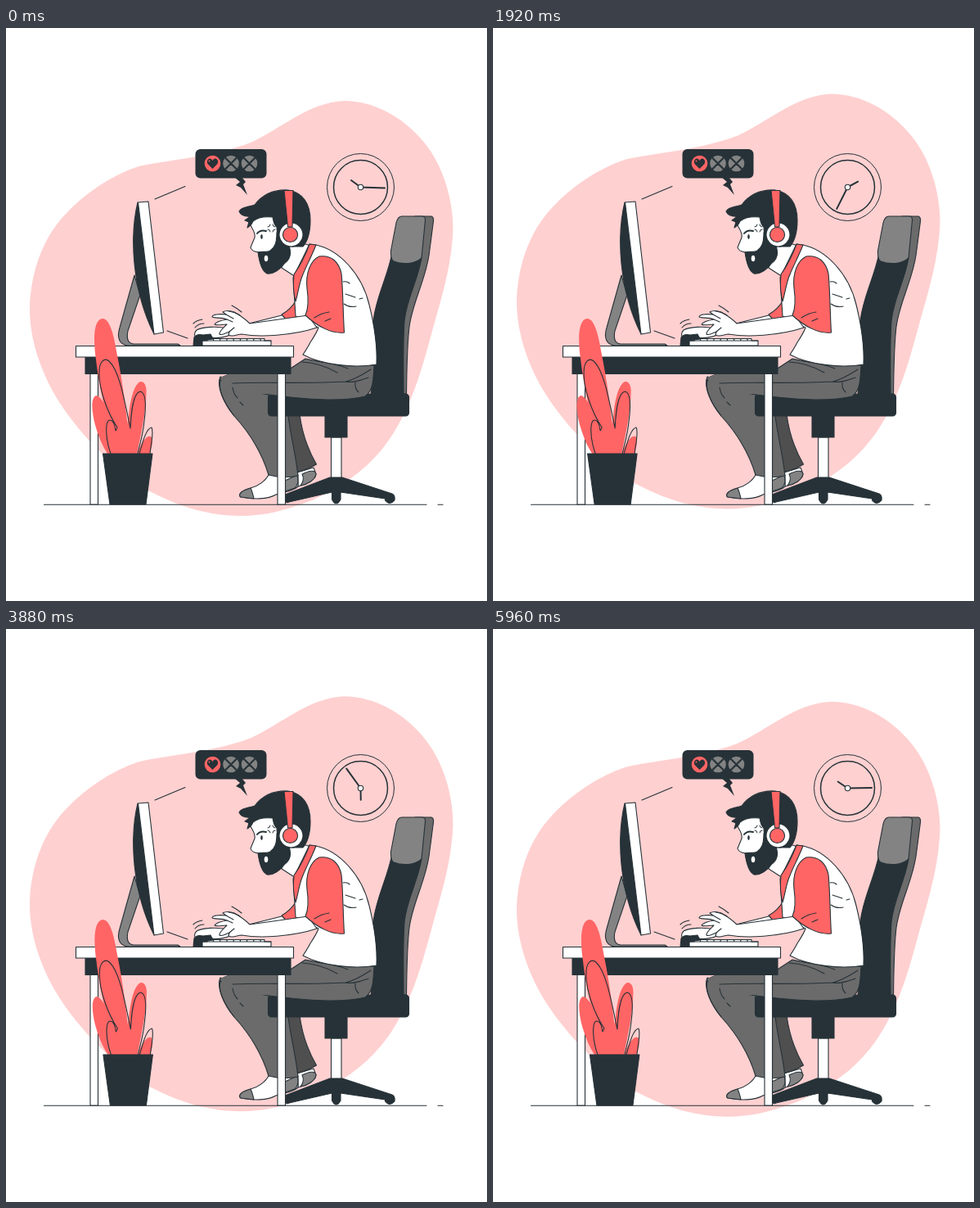
An HTML page that plays this animation: 588x700 px, repeating every 6 s.

```html
<!DOCTYPE html>
<html lang="en">
<head>
<meta charset="utf-8">
<title>Long night at the desk</title>
<style>
html, body { margin: 0; width: 100%; height: 100%; overflow: hidden; background: #fff; }
svg { display: block; width: 588px; height: 700px; }
.ink { stroke: #263238; stroke-width: 1.1; stroke-linecap: round; stroke-linejoin: round; fill: none; }
.white { fill: #fff; }
.red { fill: #ff6565; }
.dark { fill: #263238; }
.grey { fill: #838383; }
.cloth { fill: #6b6b6b; }
.shade { fill: #4f4f4f; }
.bare { stroke: none; }
</style>
</head>
<body>
<svg viewBox="0 0 588 700">
  <path id="blob" fill="#ffd0d0" d="M413 89C462 89 508 124 529 168C543 198 548 230 546 255C543 300 529 340 517 385C506 425 494 464 471 499C447 535 416 558 374 577C340 590 315 596 287 596C240 596 200 580 165 560C125 532 85 490 62 452C40 415 28 375 29 338C31 298 44 257 74 226C98 201 127 181 162 169C205 160 254 157 299 140C338 122 370 91 413 89Z"/>

  <g class="ink">
    <!-- clock -->
    <circle cx="433.5" cy="194.5" r="41" stroke-width="1"/>
    <circle cx="433.5" cy="194.5" r="33" style="stroke-width:1.5"/>
    <g id="hands" style="stroke-width:2">
      <path d="M433.5 194.5L463 195.4M433.5 194.5L422 186"/>
    </g>
    <circle class="white" cx="433.5" cy="194.5" r="3.2"/>

    <path d="M182 209L219 193.5M197 370L222 379"/>
    <path d="M46.5 582.3H514M528 582.3H534"/>

    <!-- chair back and base -->
    <path class="cloth" d="M500 230H520Q523 231 522.5 236L517 278C512 310 497 335 493 365C490 390 490 420 489.500 447H480V300Z"/>
    <path class="dark" d="M472 275C466 305 452 330 449 358L446 450H486C486 415 485 385 487 358C490 330 503 310 508 281Z"/>
    <path class="grey" d="M484 230H508Q513 230 512.500 235L508 281C500 289 484 289 474 285Q470 283 470.500 272L477 238Q479 230 484 230Z"/>
    <path class="white" d="M397.500 500H410V552H397.500Z"/>
    <path class="dark" d="M396 549H411L472 569Q476 571 475 577Q469 584 463.500 577V575L409 567V576Q403.500 586 398.500 576V567L346 579Q340 582 341 570Z"/>
    <path class="dark" d="M390 474H417V500H390Z"/>

    <!-- far leg and foot -->
    <path class="white" d="M356 543L376 537L379 545C378 552 368 558 357 560Z"/>
    <path class="grey" d="M362 545C370 541 378 539 379 545C378 552 368 558 360 559C364 554 364 549 362 545Z"/>
    <path class="shade" d="M330 460L359 472C362 495 369 515 379.500 533C371 538 365 541 356 542Z"/>

    <!-- near foot -->
    <path class="white" d="M322 544C318 553 308 560 299 562C288 565 283 570 287 573C302 576 320 576 330 570C341 566 351 566 357 560V546Z"/>
    <path class="grey" d="M299 562C288 565 283 570 287 573L303 575C302 570 301 566 299 562ZM341 553L356 546Q359 557 353 562L341 566Z"/>

    <!-- near leg, seat and thigh -->
    <path class="cloth" d="M262 426C257 438 266 458 279 474C300 497 314 523 321 546Q340 551 357 547C354 520 348 498 345 474L322 440Z"/>
    <rect class="dark" x="320.500" y="447" width="172" height="27" rx="4"/>
    <path class="cloth" d="M366 404C395 411 425 412 450 412C449 430 449 443 439 450C410 457 370 454 322 448C308 446 290 442 272 438L262 430C266 420 290 421 340 421Z"/>
    <path class="cloth bare" d="M262 427L275 422H345L325 446L300 449L268 448Z"/>
    <path d="M277 434C315 432 365 435 415 432C428 429 438 422 446 417M415 432C424 434 434 430 443 427M362 408C380 409 393 414 405 421M380 407C395 409 408 412 418 416M427 433C426 439 428 442 431 445M277 439C278 446 280 449 283 452M286 457L290 461M262 430C259 441 266 458 279 474"/>

    <!-- monitor -->
    <path class="grey" d="M157 302L139 366C135 379 139 387 149 388H213L210 386H156Q146 385 149 370L164 326Z"/>
    <path class="dark" d="M161 213C151 255 154 320 181 374Z"/>
    <path class="white" d="M161.500 213L174 212L192.500 372L181 374Z"/>

    <!-- desk -->
    <path class="white" d="M103 422H112.500V582H103ZM332 422H341.500V582H332Z"/>
    <path class="dark" d="M97 402H348V422.500H97Z"/>
    <path class="white" d="M85.500 388.500H351.500V402H85.500Z"/>

    <!-- keyboard -->
    <path class="white" d="M246 382V379.500H316V382H324V388H239.500V382Z"/>
    <path d="M240 382H324"/>
    <path d="M253 380.700H316" style="stroke-width:2.400;stroke-dasharray:1.200 7;stroke-linecap:butt"/>

    <!-- far arm and mouse -->
    <path class="white" d="M271 367C258 364 240 365 233 369C230 372 230 376 232 378H252C258 380 270 377 276 374Z"/>
    <path class="dark" d="M229 388L230 378Q233 373 241 375L250 374L253 380L240 382V388Z"/>
    <path class="white" d="M341 350L297 361L300 370L355 358Z"/>
    <path class="red" d="M355 332C350 341 344 346 337 350Q341 354 343 358L359 356Z"/>

    <!-- neck and torso -->
    <path class="white" d="M337 293L354 304L373 266L345 258Z"/>
    <path class="white" d="M379 265C407 271 435 300 444 338C450 362 454 390 453 411C425 416 385 411 363 399C367 393 370 388 372 384C376 378 380 372 382 366L354 352L351 305L371 264Z"/>
    <path class="red" d="M371 264L379 265C373 280 367 291 363 301C358 312 357 325 354 334Q350 319 352 301C359 291 366 278 371 264Z"/>
    <path d="M412 310Q417 309 420 312M413 337Q420 342 428 340M415 325L427 329M432 331L436 330"/>

    <!-- near arm -->
    <path class="white" d="M369 351L298 361C292 355 286 351 279 347C274 345 268 345 265 347L269 350C260 349 252 350 252 353C256 355 264 353 270 356C264 357 257 359 255 362C258 364 264 362 270 362C266 366 260 371 261 374C264 376 268 373 273 371L272 375C277 378 283 374 288 374C310 378 350 376 380 366Z"/>
    <path d="M269 350L278 355M270 356L277 359M273 371L279 366"/>
    <path class="red" d="M383 279C398 277 407 286 410 300C412 320 412 350 413.500 372C398 374 380 364 366 351C370 342 370 332 368 318C366 300 372 284 383 279Z"/>
    <path d="M377 354C383 350 387 348 395 347M390 358L397 355"/>
    <path d="M272 346Q280 347 286 351M276 339Q282 342 288 347M229 361Q233 357 240 356M231 366Q235 361 242 361"/>

    <!-- head -->
    <path class="white" d="M296 236C301 245 305 250 304 256L299 268Q300 273 309 274L313 284H342L345 235L325 222Z"/>
    <path class="dark" d="M285 224C288 218 297 219 304 216C314 203 328 197 345 198C363 201 372 215 372 235C372 249 369 260 363 267H348C337 264 331 255 331 243C327 240 327 235 326 231C316 230 308 231 302 236Q300 241 295 244L297 237L292 235L299 230Q288 231 285 224Z"/>
    <path class="dark" d="M308 274C314 272 318 275 323 272C329 268 331 262 331 250L336 240L346 266C349 275 348 282 341 287C335 295 328 301 319 300C313 297 310 288 308 274Z"/>
    <ellipse class="white bare" cx="318" cy="281.500" rx="2.300" ry="3.800"/>
    <path d="M307 251Q311 246 318 248" style="stroke-width:2"/>
    <ellipse class="dark bare" cx="312.500" cy="255" rx="1.300" ry="3"/>
    <path d="M320 243Q323 243 323 240M326 240Q326 243 329 243M320 246Q323 246 323 249M326 249Q326 246 329 246" stroke-width="1"/>

    <!-- headphones -->
    <circle class="white" cx="348.500" cy="252.500" r="14.500"/>
    <path class="red" d="M340 198.500H351L350 243H344.500Z"/>
    <circle class="red" cx="347.500" cy="252.500" r="9"/>

    <!-- lives bubble -->
    <g class="bare">
      <rect class="dark" x="231.500" y="148" width="87" height="35.500" rx="6"/>
      <path class="dark" d="M279 182L286 188L281 192L287 195L295 204L290 191L293 188L288 182Z"/>
      <circle class="red" cx="252.500" cy="165.500" r="9.800"/>
      <path class="dark" d="M252.500 172L246.500 166Q244.500 161 248.500 159.500Q251.500 159 252.500 162Q253.500 159 256.500 159.500Q260.500 161 258.500 166Z"/>
      <circle class="red" cx="248.500" cy="162.500" r=".9"/>
      <circle class="grey" cx="275" cy="165.500" r="9.800"/>
      <circle class="grey" cx="297.500" cy="165.500" r="9.800"/>
    </g>
    <path d="M268.500 159L281.500 172M281.500 159L268.500 172M291 159L304 172M304 159L291 172" style="stroke-width:2.200"/>

    <!-- plant -->
    <g id="plant">
      <g class="bare red">
        <path d="M118 355C106 356 107 385 110 405C114 440 125 490 140 521H152C148 470 142 430 136 400C132 375 127 355 118 355Z"/>
        <path d="M110 449C103 452 105 470 109 485C114 502 120 515 125 521H143C134 495 122 450 110 449Z"/>
        <path d="M165 432C158 433 152 450 150 475L140 521H160C166 490 171 470 171.500 445C172 437 169 432 165 432Z"/>
        <path d="M177 499C171 497 165 508 160 521H175C179 512 180 502 177 499Z"/>
      </g>
      <path d="M136 488C124 470 113 440 114 420C114 408 120 402 126 407C138 418 144 450 152 489C153 470 155 446 164 444C172 445 171 465 169 480C167 500 163 510 161 520M128 520C121 500 121 479 127 479C131 479 133 485 134 492L136 488M163 520C168 502 172 489 178 488C181 493 177 510 176 520"/>
      <path class="dark" d="M118.500 520H179L171 582H127Z"/>
    </g>
  </g>
</svg>
<script>
const LOOP = 6000, FPS = 24, SCALE = 1.176;
const blob = document.getElementById('blob');
const hands = document.getElementById('hands');
const plant = document.getElementById('plant');
// Sideways offsets at every tenth of the loop.
const shake = [0, -1, 2, -4, 4, -4, 4, -4, 2, -1, 0];

function shakeAt(p) {
  const k = Math.floor(p * 10);
  return shake[k] + (shake[k + 1] - shake[k]) * (p * 10 - k);
}

function draw(now) {
  const frames = LOOP / 1000 * FPS;
  const p = Math.floor((now + 5) * FPS / 1000) % frames / frames;
  const lift = 1 - Math.abs(1 - (p * 4) % 2);
  blob.setAttribute('transform', `translate(0 ${-10 * SCALE * lift})`);
  hands.setAttribute('transform', `rotate(${360 * p} 433.5 194.5)`);
  plant.setAttribute('transform', `translate(${SCALE * shakeAt(p)} 0)`);
}

const start = performance.now();
function tick() {
  draw(performance.now() - start);
  requestAnimationFrame(tick);
}
tick();
</script>
</body>
</html>
```
